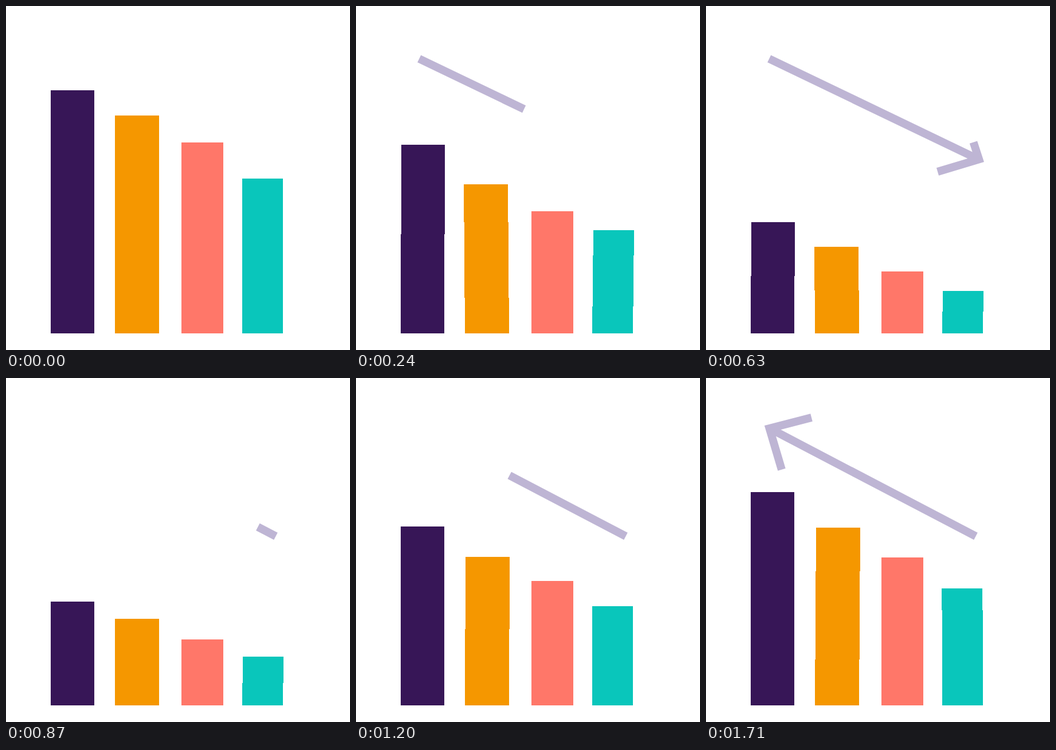
An HTML page that plays this animation: 600 by 600 pixels, repeating every 2.04 s.

```html
<!DOCTYPE html>
<html lang="en">
<head>
<meta charset="utf-8">
<title>Falling and rising bars</title>
<style>
  html, body { margin: 0; width: 100%; height: 100%; overflow: hidden; background: #fff; }
  svg { display: block; width: 100%; height: 100%; }
  #bars { shape-rendering: crispEdges; }
  #arrows { fill: none; stroke: #beb5d4; stroke-width: 14; stroke-miterlimit: 10; }
</style>
</head>
<body>
<svg viewBox="0 0 600 600">
  <g id="bars"></g>
  <g id="arrows"></g>
</svg>
<script>
const STEP = 30, LOOP = 2040, LAST = 57, TURN = 27, BASE = 571;

// Key steps of the bars: they fall until TURN, then rise and settle.
const fallKeys = [0, 8, 13, 21, TURN];
const riseKeys = [TURN, 35, 45, 52];
const allKeys = [...fallKeys, ...riseKeys.slice(1)];

const bars = [
  { color: '#371657', left: 78, right: 154,
    tops: [147, 242, 305, 377, 418, 312, 221, 199], lean: [0, 1, 0, 1, 0, 0, 0, 0] },
  { color: '#f59700', left: 190, right: 267,
    tops: [191, 311, 361, 420, 443, 356, 280, 261], lean: [0, -2, -2, -1, 0, 1, 1, 2] },
  { color: '#ff7769', left: 306, right: 379,
    tops: [238, 358, 406, 463, 480, 394, 327, 313], lean: [0, 0, -1, 0, 0, 0, 0.6, 0] },
  { color: '#09c6bb', left: 412, right: 483,
    tops: [301, 391, 447, 497, 507, 432, 376, 367], lean: [0, 2, 2, 1, 1, 1.5, -0.6, -0.6] }
];

// Each stroke is drawn evenly from start to end and removed at gone.
const strokes = [
  { d: 'M110.2 92L476 267.8', start: 0, end: 16, gone: TURN },
  { d: 'M404 289L476.1 267.4L453.3 197', start: 16, end: 23, gone: TURN },
  { d: 'M470.5 276L111.7 88.3', start: TURN, end: 50, gone: Infinity },
  { d: 'M184 69L110.7 87.9L132 159.7', start: 50, end: LAST, gone: Infinity }
];

function add(parent, attrs) {
  const node = document.createElementNS('http://www.w3.org/2000/svg', 'path');
  for (const key in attrs) node.setAttribute(key, attrs[key]);
  return document.getElementById(parent).appendChild(node);
}

// Smooth polynomial through all points
function curve(xs, ys, x) {
  return xs.reduce((sum, xi, i) =>
    sum + xs.reduce((term, xj, j) => j === i ? term : term * (x - xj) / (xi - xj), ys[i]), 0);
}

function linear(xs, ys, x) {
  const i = xs.findIndex(key => key >= x);
  if (i === 0) return ys[0];
  const u = (x - xs[i - 1]) / (xs[i] - xs[i - 1]);
  return ys[i - 1] + (ys[i] - ys[i - 1]) * u;
}

function barPath(bar, step) {
  const x = Math.min(step, allKeys[allKeys.length - 1]);
  const turn = fallKeys.length - 1;
  const top = Math.round(x <= TURN
    ? curve(fallKeys, bar.tops.slice(0, turn + 1), x)
    : curve(riseKeys, bar.tops.slice(turn), x));
  const lean = linear(allKeys, bar.lean, x);
  return `M${bar.left} ${BASE}L${bar.left + lean} ${top}H${bar.right + lean}L${bar.right} ${BASE}Z`;
}

for (const bar of bars) bar.node = add('bars', { fill: bar.color });
for (const s of strokes) s.node = add('arrows', { d: s.d, pathLength: 1 });

function draw(time) {
  const step = Math.min(LAST, Math.floor(time % LOOP / STEP));
  for (const bar of bars) bar.node.setAttribute('d', barPath(bar, step));
  for (const s of strokes) {
    const part = Math.min(1, (step - s.start) / (s.end - s.start));
    const visible = part > 0 && step < s.gone;
    s.node.setAttribute('visibility', visible ? 'visible' : 'hidden');
    if (visible) s.node.setAttribute('stroke-dasharray', part < 1 ? `${part} 2` : 'none');
  }
}

let origin;
function tick(now) {
  origin ??= now;
  draw(now - origin);
  requestAnimationFrame(tick);
}
draw(0);
requestAnimationFrame(tick);
</script>
</body>
</html>
```
